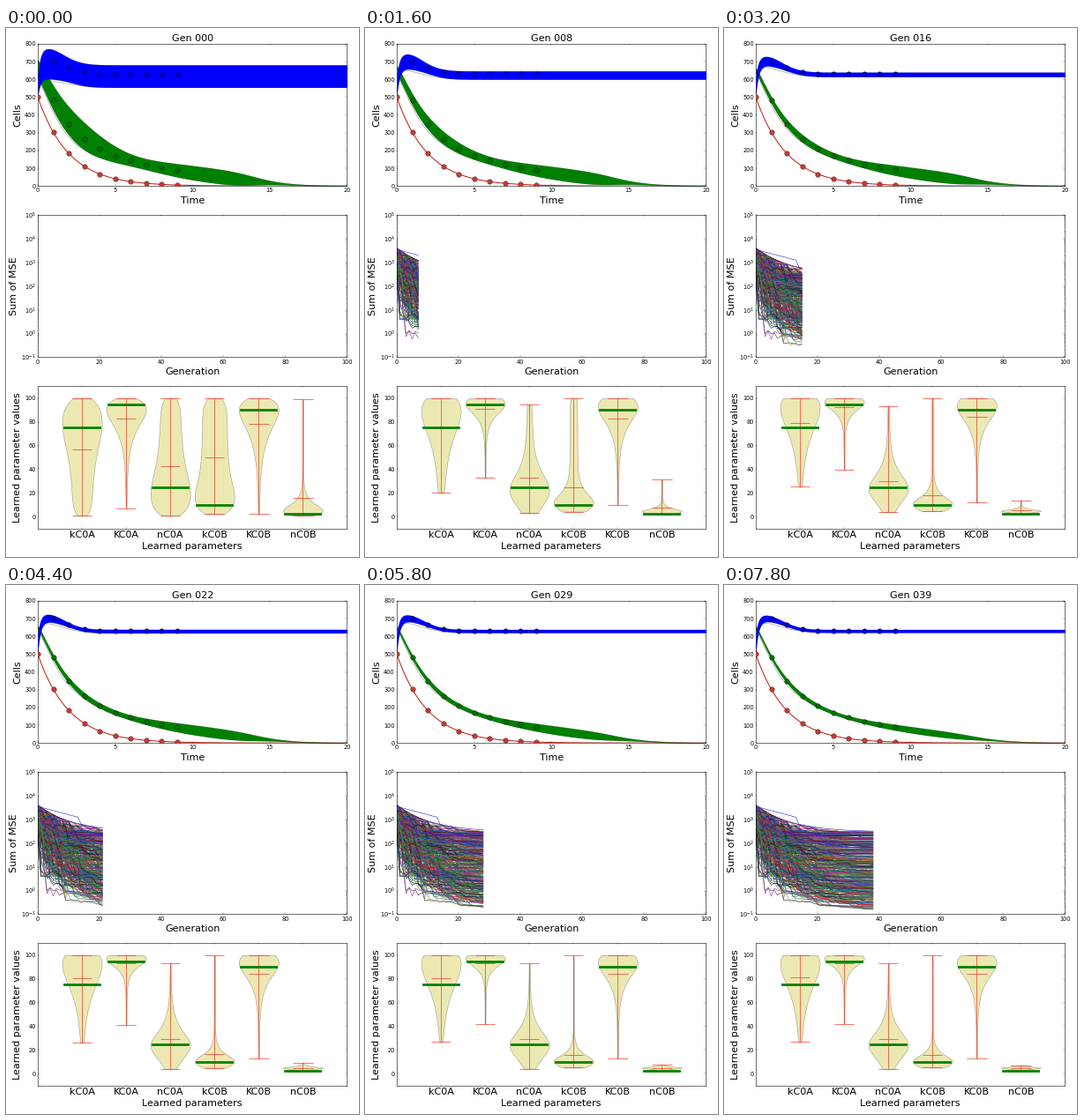
A matplotlib script that plays this animation: 400 by 600 pixels, repeating every 8000 ms.

```python
import numpy as np
import matplotlib.pyplot as plt
from matplotlib.animation import FuncAnimation
from matplotlib.collections import LineCollection

plt.rcParams.update({"font.family": "DejaVu Sans", "font.size": 12,
                     "axes.linewidth": 1, "axes.titlepad": 5, "axes.labelpad": 5.6})
for axis, far_side in (("xtick", "top"), ("ytick", "right")):
    plt.rcParams.update({f"{axis}.direction": "in", f"{axis}.{far_side}": True,
                         f"{axis}.major.size": 4, f"{axis}.minor.size": 2,
                         f"{axis}.major.width": 0.5, f"{axis}.minor.width": 0.5,
                         f"{axis}.major.pad": 4})

W, H, DPI = 400, 600, 40
GENS, STEP = 40, 200
BIG = 20
BLUE, GREEN = "#0000ff", "#008000"

rng = np.random.default_rng(7)
fig = plt.figure(figsize=(W / DPI, H / DPI), dpi=DPI, facecolor="white")


def panel(row, xlabel, ylabel):
    top = 18 + 194.2 * row
    ax = fig.add_axes([36 / W, 1 - (top + 161.2) / H, 350.4 / W, 161.2 / H])
    ax.set_xlabel(xlabel, fontsize=BIG)
    ax.set_ylabel(ylabel, fontsize=BIG)
    return ax


def settle(gen, start, end, pace=6):
    """Exponential approach from start to end as the generations pass."""
    return end + (start - end) * np.exp(-gen / pace)


def bump(x, centre, width):
    return np.exp(-((x - centre) / width) ** 2)


def sigmoid(x):
    return 1 / (1 + np.exp(-x))


# Cell counts over time
cells = panel(0, "Time", "Cells")
cells.set(xlim=(0, 20), ylim=(0, 800), xticks=range(0, 21, 5))
title = cells.set_title("", fontsize=BIG)
t = 20 * np.linspace(0, 1, 320) ** 2


def red_curve(t):
    return 500 * np.exp(-t / 2)


def green_curve(t):
    tail = 13 * np.log1p(np.exp((16.5 - t) / 1.2))
    return 470 * np.exp(-t / 2.15) + tail + 90 * t * np.exp(-1.6 * t)


def blue_curve(t):
    return 630 + 75 * bump(t, 0.5, 1.75)


def green_band(gen):
    early = settle(gen, 1, 0.13, 8) * bump(t, 2.2, 3.2)
    late = 42 * (1 - 0.6 * gen / GENS) * sigmoid((t - 7) / 1.3) * sigmoid((14 - t) / 0.8)
    mid = green_curve(t)
    return np.maximum(mid - 60 * early - late - 2, 0), mid + 95 * early + late + 2


def blue_band(gen):
    hump = bump(t, 0.7, 1.1)
    above = settle(gen, 52, 9, 5) * (1 - hump) + settle(gen, 70, 15, 10) * hump
    below = settle(gen, 75, 8, 7) * (1 - hump) + settle(gen, 100, 18, 7) * hump
    low, high = blue_curve(t) - below, blue_curve(t) + above
    low -= (low[0] - 505) * np.exp(-t / 0.17)
    high -= (high[0] - 610) * np.exp(-t / 0.15)
    return low, high


bands = ((green_band, GREEN, 2), (blue_band, BLUE, 3))
strays = [cells.plot(t, 0 * t, color="#202828", lw=1, alpha=0.5, zorder=1)[0] for _ in bands]
cells.plot(t, red_curve(t), color="#c01c10", lw=1.8, zorder=4)
for curve, color, first in ((green_curve, "#007000", 1), (blue_curve, "#0000d0", 1),
                            (red_curve, "#c83a32", 0)):
    days = np.arange(first, 10)
    cells.plot(days, curve(days), "o", ms=10, mfc=color, mec=(0, 0, 0, 0.75), mew=0.8, zorder=5)

# Error of every individual, falling in random steps
errors = panel(1, "Generation", "Sum of MSE")
errors.set(xlim=(0, 100), ylim=(1e-1, 1e5), yscale="log")
N = 320
g = np.arange(GENS)
roof = 2.47 + 1.15 * np.exp(-g / 11)
start = rng.normal(2.95, 0.35, (N, 1))
final = np.minimum(2.5 - 3.3 * rng.random((N, 1)) ** 1.15, start)
drops = rng.exponential(1, (N, GENS)) * (rng.random((N, GENS)) < 0.4)
drops *= np.exp(-g / rng.uniform(6, 12, (N, 1)))
drops[:, 0] = 0
progress = np.cumsum(drops, axis=1) / drops.sum(axis=1, keepdims=True)
logs = start + (final - start) * progress
logs += rng.normal(0, 0.15, (N, GENS)) * np.exp(-g / 7)
logs[-1] = np.where(g < 14, 3.55 - 0.035 * g, roof)
logs[-2] = 2.9 - 3.4 * (1 - np.exp(-g / 8))
logs[-2, 9] = -0.4
logs = np.clip(logs, -0.95, np.where(np.arange(N)[:, None] == N - 1, 4, roof))
paths = np.stack([np.broadcast_to(g, logs.shape), 10.0 ** logs], axis=2)
tints = rng.choice(["#2020d0", "#188030", "#d02828", "#208890", "#902890", "#8a8440",
                    "#181818", "#303840"], N)
history = LineCollection([], colors=tints, linewidths=1)
errors.add_collection(history, autolim=False)

# Spread of the learned parameters
params = panel(2, "Learned parameters", "Learned parameter values")
params.set(xlim=(0, 7), ylim=(-10, 110), yticks=range(0, 101, 20))


class Violin:
    """Pairs hold the values at the start and after settling."""

    def __init__(self, name, true, mean, mode, fall, low, high=(100, 100), base=0.02):
        self.name, self.true, self.base = name, true, base
        self.pairs = low, high, mean, mode, fall

    def at(self, gen):
        low, high, mean, mode, fall = (settle(gen, *pair) for pair in self.pairs)
        v = np.linspace(low, high, 120)
        half = 1 / np.cosh((v - mode) / fall) + settle(gen, self.base, 0.02, 4)
        edge = np.minimum(v - low, high - v)
        half *= 1 - settle(gen, 0.5, 0.15) * np.exp(-edge / 5)
        return v, 0.45 * half / half.max(), (low, mean, high)


violins = [
    Violin("kC0A", 75, (57, 81), (80, 96), (22, 21), (1, 27), base=0.8),
    Violin("KC0A", 95, (83, 93.5), (94, 98), (15, 6), (7, 42)),
    Violin("nC0A", 25, (42.5, 29), (17, 24), (20, 11), (1, 4), (100, 93), base=0.9),
    Violin("kC0B", 10, (50, 15.5), (14, 10), (14, 5), (2, 5), base=1.5),
    Violin("KC0B", 90, (78.5, 84.5), (95, 95), (18, 12), (2, 13)),
    Violin("nC0B", 2, (16, 4.5), (3, 4.9), (5.5, 0.8), (1, 2), (99, 7)),
]
spots = range(1, len(violins) + 1)
params.set_xticks(spots, [v.name for v in violins], fontsize=BIG)
for x, violin in zip(spots, violins):
    params.plot([x - 0.4, x + 0.4], [violin.true] * 2, color=GREEN, lw=5,
                solid_capstyle="projecting", zorder=4)
bars = LineCollection([], colors="#f02010", linewidths=1.1, zorder=3)
params.add_collection(bars, autolim=False)

fills = []


def draw(gen):
    while fills:
        fills.pop().remove()
    title.set_text(f"Gen {gen:03d}")

    for (band, color, z), stray in zip(bands, strays):
        low, high = band(gen)
        fills.append(cells.fill_between(t, low, high, fc=color, ec=(0, 0, 0, 0.4), lw=0.6, zorder=z))
        stray.set_ydata(np.maximum(low - 13 * bump(t, 1.5, 1.2), 0))

    history.set_segments(list(paths[:, :gen]) if gen > 1 else [])

    lines = []
    for x, violin in zip(spots, violins):
        v, half, marks = violin.at(gen)
        fills.append(params.fill_betweenx(v, x - half, x + half, fc=(0.75, 0.7, 0, 0.3),
                                          ec=(0, 0, 0, 0.35), lw=1, zorder=2))
        lines.append([(x, marks[0]), (x, marks[-1])])
        lines += [[(x - 0.225, y), (x + 0.225, y)] for y in marks]
    bars.set_segments(lines)
    return []


anim = FuncAnimation(fig, draw, frames=GENS, init_func=lambda: draw(0),
                     interval=STEP, repeat=True, repeat_delay=0, blit=False)
plt.show()
```
